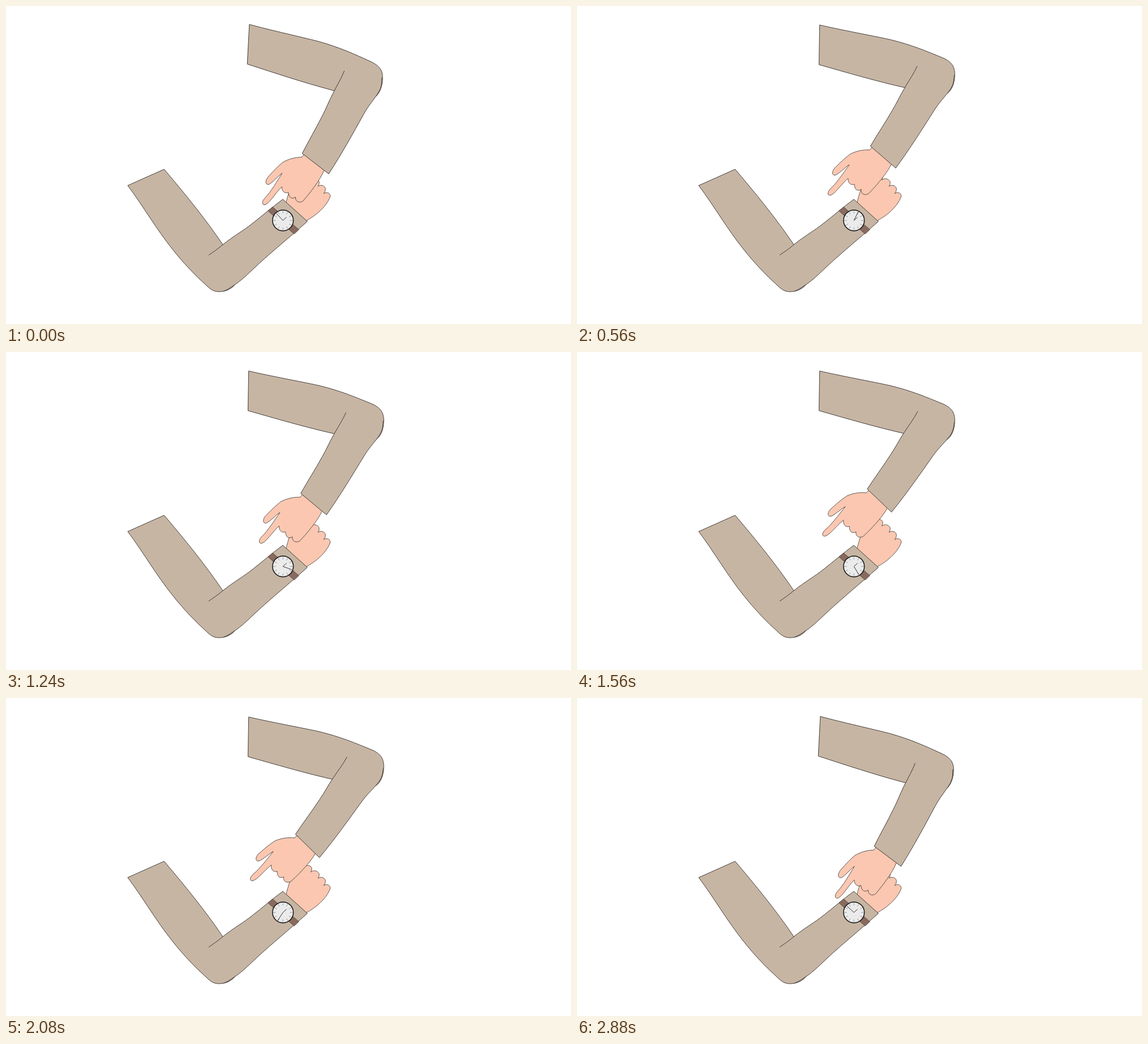
An HTML page with a canvas for the animation above (2920 ms loop, 998x561 px).

```html
<!DOCTYPE html>
<html lang="en">
<head>
<meta charset="utf-8">
<title>Tapping the watch</title>
<style>
html, body { margin: 0; width: 100%; height: 100%; overflow: hidden; background: #fff; }
canvas { display: block; }
</style>
</head>
<body>
<canvas id="stage" width="998" height="561"></canvas>
<script>
const ctx = document.getElementById('stage').getContext('2d');
const LOOP = 2920, STEP = 40, RAD = Math.PI / 180;
const CLOTH = '#c7b5a3', SKIN = '#fbc7b0', STRAP = '#8a6a5e', INK = '#3a3634';

const SHOULDER = [455, 68], ELBOW = [632, 126], REST = 40.9;
const WATCH = [489.2, 378.3];

// [time, cuff angle]
const BEND = [
  [0, 37.6], [330, 45.2], [560, 40.9], [740, 34], [920, 40.2], [1090, 49],
  [1350, 34], [1560, 43.6], [1660, 48.7], [1880, 34], [2080, 44.3],
  [2170, 48.2], [2240, 45.8], [2480, 34], [2720, 33.9], [2880, 36.8]
];
// [time, drop of the upper arm in degrees]
const DROP = [[0, 2.1], [60, 2.05], [300, 0], [2490, 0], [2760, 2.1]];

const leftUpper = new Path2D(
  'M383,421 C352,375 315,330 279.3,288 L215,316.7 C243,354 265,393 294,429 ' +
  'C312,452 335,476 352,491 C360,499 366,504 376,504 C390,504 399,498 405,491');
const leftFore = new Path2D(
  'M358,439.5 C366,434 375,428 383,421 C403,405 420,396 436,383 C454,369 471,354 489,341 ' +
  'L532.3,380 C501,408 470,433 442,459 C425,475 415,485 402,493 C395,498 390,501 384,503');
const fist = new Path2D(
  'M494,350 C496,340 499,331 502,322 C508,312 519,305 528,297 C534,293 541,297 540,302 ' +
  'Q540,305 538.5,307 C546,301 555,308 553,313 Q553,316 551,318 C559,313 566,320 564,325 ' +
  'Q564,328 561,331 C568,326 575,332 572,338 C565,355 547,370 530,379');

const upper = new Path2D(
  'M612,151 L579,144 C530,133 475,117 427.5,103.5 L428.6,33.5 C470,43 520,52 552,59 ' +
  'C590,68 618,80 645,91 C662,98 667.3,107 667.3,121 C667,137 662,149 653,155');
const fore = new Path2D(
  'M601,106 C595,119 586,132 579,144 C570,159 565,171 557,184 C545,205 530,227 518.3,247.3 ' +
  'L563,286 C588,252 610,217 631,184 C640,170 648,162 655,153 C661,145 666,139 666.3,122');
const hand = new Path2D(
  'M525,246 L521,250 Q518,252 517,254 C506,253 493,256 483,261 C472,269 461,280 455,286 ' +
  'C450,292 450,299 456,298.5 C463,296 473,285 481,280 C470,295 459,312 448,322 ' +
  'C442,328 442,334 447,334 C456,332 466,315 479,304 C478,312 484,317 490,314.5 ' +
  'C490,323 495,328 502,323.5 C501,332 509,335 515,331 C526,320 535,309 542,300 ' +
  'C548,292 552,286 555,279.5');

function curve(keys, t) {
  const n = keys.length;
  const key = i => {
    const k = keys[(i + n) % n];
    return [k[0] + LOOP * Math.floor(i / n), k[1]];
  };
  let i = n - 1;
  while (i > 0 && keys[i][0] > t) i--;
  const slope = (a, b) => (b[1] - a[1]) / (b[0] - a[0]);
  // tangents vanish at the turning points
  const tangent = j => {
    const a = slope(key(j - 1), key(j)), b = slope(key(j), key(j + 1));
    return a * b <= 0 ? 0 : 2 * a * b / (a + b);
  };
  const [t0, v0] = key(i), [t1, v1] = key(i + 1);
  const h = t1 - t0, u = (t - t0) / h, w = 1 - u;
  return v0 * w * w * (1 + 2 * u) + v1 * u * u * (3 - 2 * u) +
    h * u * w * (tangent(i) * w - tangent(i + 1) * u);
}

function turn([x, y], deg) {
  ctx.translate(x, y);
  ctx.rotate(deg * RAD);
  ctx.translate(-x, -y);
}

function shape(path, fill, width = 0.95) {
  ctx.fillStyle = fill;
  ctx.fill(path);
  ctx.strokeStyle = INK;
  ctx.lineWidth = width;
  ctx.stroke(path);
}

function ray(deg, from, to, width, color) {
  const s = Math.sin(deg * RAD), c = -Math.cos(deg * RAD);
  ctx.beginPath();
  ctx.moveTo(s * from, c * from);
  ctx.lineTo(s * to, c * to);
  ctx.lineWidth = width;
  ctx.strokeStyle = color;
  ctx.stroke();
}

const strap = new Path2D('M462.6,361.3 L471,354.6 L517.3,394.5 L509,402.3 Z');
const dial = new Path2D();
dial.arc(0, 0, 18.4, 0, 7);

function watch(t) {
  shape(strap, STRAP, 0.7);
  ctx.save();
  ctx.translate(...WATCH);
  ctx.fillStyle = '#ebebeb';
  ctx.fill(dial);
  for (let a = 0; a < 360; a += 30) ray(a, 12.5, 17, 0.7, '#77777f');
  ray(48, 0, 8.5, 0.9, '#222');
  ray(-43 + 360 * t / LOOP, 0, 17, 0.9, '#222');
  ctx.lineWidth = 1.5;
  ctx.strokeStyle = '#111';
  ctx.stroke(dial);
  ctx.restore();
}

function draw(t) {
  ctx.fillStyle = '#fff';
  ctx.fillRect(0, 0, 998, 561);

  shape(fist, SKIN, 0.8);
  shape(leftUpper, CLOTH);
  shape(leftFore, CLOTH);
  watch(t);

  const drop = curve(DROP, t);
  ctx.save();
  turn(SHOULDER, drop);
  shape(upper, CLOTH);
  turn(ELBOW, curve(BEND, t) - REST - drop);
  shape(hand, SKIN, 0.8);
  shape(fore, CLOTH);
  ctx.restore();
}

function tick() {
  draw(Math.floor(performance.now() % LOOP / STEP) * STEP);
  requestAnimationFrame(tick);
}
tick();
</script>
</body>
</html>
```
